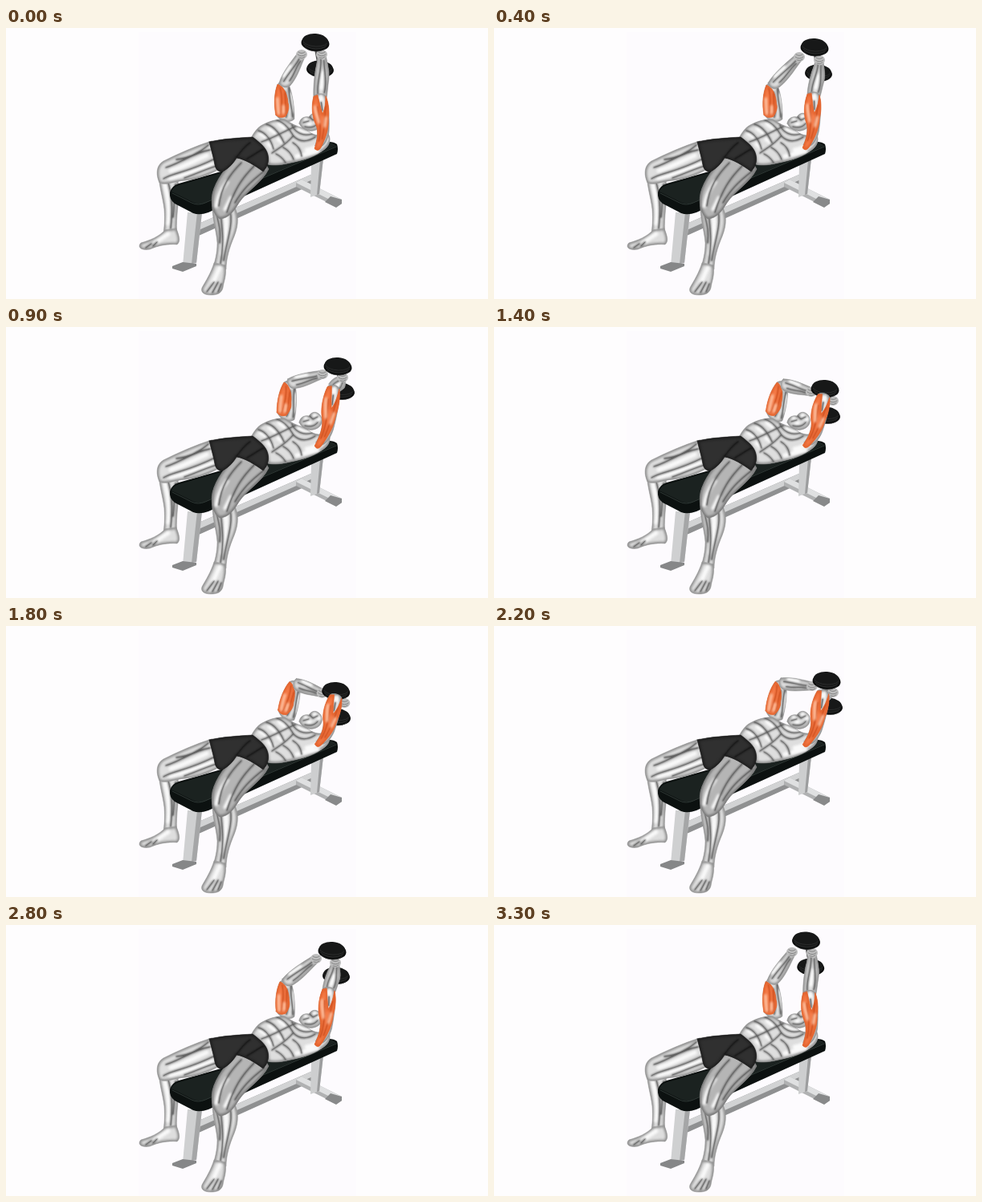
Animation, 600 px wide and 338 px high, one loop 3.4 s. Source, as an HTML page with a canvas:

```html
<!DOCTYPE html>
<html lang="en">
<head>
<meta charset="utf-8">
<title>Lying dumbbell extension</title>
<style>
html, body { margin: 0; width: 100%; height: 100%; overflow: hidden; background: #fefdfe; }
canvas { display: block; }
</style>
</head>
<body>
<canvas id="stage" width="600" height="338"></canvas>
<script>
const ctx = document.getElementById('stage').getContext('2d');
const SKIN = '#dedede', SHADE = '#8c8c8c', LINE = '#555';
const STEP = 100, STEPS = 34;

// step, far elbow, far wrist, near elbow, near wrist, upper plate, lower plate
const poses = [
  [0, 346, 70, 368, 33, 391, 85, 393, 33, 385, 18, 391, 51],
  [4, 347, 71, 380, 36, 398, 83, 405, 40, 399, 24, 404, 56],
  [6, 349, 71, 386, 42, 402, 81, 410, 47, 406, 32, 411, 63],
  [9, 354, 70, 394, 59, 408, 76, 419, 63, 413, 49, 417, 80],
  [12, 358, 71, 396, 75, 410, 83, 422, 83, 414, 68, 417, 100],
  [14, 360, 71, 395, 81, 411, 86, 422, 92, 412, 77, 414, 110],
  [17, 361, 72, 393, 85, 411, 89, 421, 98, 410, 83, 411, 115]
];

function poseAt(step) {
  const k = Math.min(step, STEPS - step);
  const i = Math.max(1, poses.findIndex(p => p[0] >= k));
  const a = poses[i - 1], b = poses[i];
  const f = (k - a[0]) / (b[0] - a[0]);
  const v = a.map((n, j) => n + (b[j] - n) * f);
  return [1, 3, 5, 7, 9, 11].map(j => [v[j], v[j + 1]]);
}

function fill(d, color) {
  ctx.fillStyle = color;
  ctx.fill(new Path2D(d));
}

function stroke(d, color, width, blur = 0) {
  ctx.filter = blur ? `blur(${blur}px)` : 'none';
  ctx.strokeStyle = color;
  ctx.lineWidth = width;
  ctx.stroke(new Path2D(d));
  ctx.filter = 'none';
}

// Rounded muscle: flat base, soft dark rim, creases and highlights
function part(d, lines = '', glow = '', base = SKIN, rim = SHADE, crease = LINE) {
  ctx.save();
  fill(d, base);
  ctx.clip(new Path2D(d));
  stroke(d, rim, 4, 1.8);
  stroke(glow, '#fafafa', 5, 1.6);
  stroke(lines, crease, 1.8, 1.1);
  stroke(lines, crease, 0.6, 0.4);
  ctx.restore();
  stroke(d, rim, 0.5);
}

// Local space: origin at a, y runs 0..50 towards b, x in pixels
function bone(a, b, draw) {
  const dx = b[0] - a[0], dy = b[1] - a[1], len = Math.hypot(dx, dy);
  ctx.save();
  ctx.transform(-dy / len, dx / len, dx / 50, dy / 50, a[0], a[1]);
  draw();
  ctx.restore();
}

function orange(d, lines, glow) {
  part(d, lines, '', '#f67c49', '#e2632d', '#cf5120');
  stroke(glow, '#ffcdb0', 3, 1.4);
}

function ellipse(x, y, rx, ry, tilt, color) {
  ctx.beginPath();
  ctx.ellipse(x, y, rx, ry, tilt, 0, 7);
  ctx.fillStyle = color;
  ctx.fill();
}

function plate([x, y], rx, ry) {
  ellipse(x, y + 1, rx, ry - 1, 0.08, '#0b0c0c');
  ellipse(x, y - 1, rx - 1, ry - 1, 0.08, '#171818');
  for (let i = 0; i < 3; i++) {
    ctx.beginPath();
    ctx.ellipse(x, y - 2 + i * 3, rx - 2 - i, ry - 4, 0.08, 0.3, 2.8);
    ctx.lineWidth = 0.8;
    ctx.strokeStyle = '#303232';
    ctx.stroke();
  }
}

function hand([x, y]) {
  ellipse(x, y, 7, 6, 0, '#bdbdbd');
  stroke(`M${x - 4} ${y - 3}q4 3 8 0M${x - 5} ${y}q5 4 10 0M${x - 3} ${y + 4}q4 2 7 -1`, '#777', 0.8);
}

function bench() {
  fill('M240 244L384 181V194L240 259Z', '#8f9091');
  fill('M240 244L384 181V188L240 252Z', '#d2d3d4');
  fill('M361 193L368 189L418 214V219L411 223L361 198Z', '#b0b1b2');
  fill('M361 193L368 189L418 214L411 218Z', '#dfe0e1');
  fill('M397 217L404 210L418 214V219L411 224Z', '#88898a');
  fill('M380 170L395 163L390 207L379 211Z', '#cdcecf');
  fill('M391 165L395 163L390 207L387 208Z', '#9c9d9e');
  fill('M226 230H244L237 293L220 296Z', '#cfd0d1');
  fill('M238 230H244L237 293L231 294Z', '#a5a6a7');
  fill('M207 297L220 292L237 294V297L220 304L207 300Z', '#868788');
  fill('M204 205Q206 197 215 194L394 143Q406 140 412 145Q414 151 412 157L252 230Q241 234 233 231L210 219Q203 214 204 205Z', '#0c1110');
  fill('M206 204Q208 198 216 196L394 144Q405 141 411 147L248 218Q239 221 232 217Z', '#1b2220');
  stroke('M207 206L231 218Q239 222 248 218L411 148', '#303936', 1, 0.4);
}

function farCalf() {
  part('M190 180C190 196 195 210 197 226C198 240 197 249 196 256L213 258C211 244 214 225 215 208L214 186Z',
    'M201 190C206 205 208 222 205 250M211 195C209 210 210 220 208 236', 'M198 196C203 215 204 228 202 244');
  part('M198 252C191 260 179 265 168 268C163 273 168 278 179 276C190 271 202 269 213 270C218 266 215 258 212 250Z',
    'M181 269L174 274M188 267L183 272', 'M202 257L187 267');
}

function farThigh() {
  part('M256 141C236 147 212 158 196 166C186 172 187 184 191 193C199 197 209 191 224 190C243 188 258 180 272 173Z',
    'M199 174C216 169 235 155 254 152M196 188C207 181 226 180 260 163M222 187C234 183 244 178 262 172M212 164C224 163 238 158 252 146',
    'M205 178C222 173 234 166 250 159M204 187C218 185 236 178 256 170');
}

function nearLeg() {
  part('M257 212C255 233 262 252 263 268C263 282 260 290 258 299L274 301C274 288 278 274 284 260C290 245 290 232 283 220Z',
    'M267 230C269 250 272 265 267 294M279 228C283 246 275 264 271 290M262 232C266 248 267 255 266 268', 'M273 232C276 250 272 266 269 282');
  part('M259 293C255 306 249 315 244 324C242 330 247 333 255 333C263 333 268 331 270 324C271 316 275 309 273 296Z',
    'M259 317L250 329M264 317L257 330M268 319L264 329', 'M266 299L258 317');
  part('M290 157C274 172 261 190 257 206C254 222 259 234 266 238C277 238 284 228 290 218C299 204 318 194 327 176L318 160Z',
    'M293 168C278 183 268 198 265 222M309 172C293 188 284 202 275 230M322 178C304 192 295 201 285 218',
    'M275 192C266 204 264 212 262 222M280 212L273 226', '#b5b5b5', '#747474');
}

function shorts() {
  part('M253 142C270 138 290 137 307 136C316 143 324 149 326 158C328 167 325 174 320 179C309 171 298 164 287 162C283 169 277 175 270 179C264 180 261 176 260 171C258 160 255 151 253 142Z',
    'M287 161C292 155 296 148 304 143M300 163C310 158 316 152 321 151', '', '#303030', '#1e1e1e', '#161616');
}

function head() {
  part('M365 119C366 112 372 110 377 111C380 106 385 105 389 108C395 112 395 122 388 126C380 131 369 128 365 119Z',
    'M370 118L377 116M378 111L382 115L388 112M372 123C379 125 384 124 388 119', 'M373 114L378 120M384 110L390 115');
}

function torso() {
  part('M305 137C309 130 313 124 319 121C328 116 339 113 347 114C355 119 362 123 371 125C381 133 391 138 400 130C405 137 404 145 397 151C386 160 371 165 355 168C343 171 332 172 326 170C326 153 316 142 305 137Z',
    'M318 142C331 138 346 129 360 123M331 156C341 149 350 144 357 135M314 128C323 130 330 139 333 151M324 120C333 122 340 130 346 143M337 115C347 118 352 125 358 135M356 121C359 130 371 137 384 131M358 135C366 143 376 142 385 136M336 157C342 160 345 163 348 168M345 149C351 152 355 156 358 164M357 143C364 147 367 152 368 160',
    'M317 132L323 136M328 126L335 131M340 120L347 125M327 145L332 149M339 139L344 142M364 127C369 131 374 132 380 131M374 152C386 150 393 145 399 138M362 160L388 154');
}

function farArm(elbow, wrist) {
  bone([348, 115], elbow, () => {
    part('M-11 7C-14 24 -12 40 -8 50C-3 55 4 54 6 49C10 37 12 17 11 1C5 -5 -6 -2 -11 7Z',
      'M6 45C5 30 9 17 9 4M1 40C3 27 4 15 1 4', 'M8 36L9 12');
    orange('M-12 8C-14 25 -12 40 -8 50C0 48 4 34 4 24C6 16 3 10 0 5C-5 3 -9 4 -12 8Z',
      'M-5 45C-2 31 -4 18 -6 8M1 38C0 26 2 18 0 9', 'M-9 31C-9 24 -9 16 -8 9M-2 20L-2 10');
  });
  bone(elbow, wrist, () => part('M-6 -2C-9 13 -7 31 -5 51L5 51C6 37 10 21 8 5C7 -5 -3 -6 -6 -2Z',
    'M-2 3C-2 18 1 34 0 47M4 8C5 20 2 30 3 41', 'M-5 10L-4 27'));
  hand(wrist);
}

function nearForearm(elbow, wrist) {
  bone(elbow, wrist, () => part('M-8 -2C-9 12 -8 22 -7 32C-5 41 -5 47 -5 51L5 51C6 43 11 32 10 21C9 11 9 3 8 -3Z',
    'M-3 2C-5 18 1 30 -1 46M5 4C8 17 4 31 3 43', 'M1 10L2 28'));
  hand(wrist);
}

function nearUpperArm(elbow) {
  bone([394, 150], elbow, () => {
    part('M-9 3C-4 12 -5 19 -8 29C-11 38 -10 47 -7 51C-3 53 5 53 7 50C11 39 10 25 9 16C7 6 0 -2 -9 3Z',
      'M2 36L1 44', 'M1 49L2 36');
    orange('M-8 50C-12 40 -11 30 -7 23C-4 17 -5 10 -10 0C-5 -4 -2 0 1 5C5 11 9 18 9 28C11 36 10 44 7 50C6 41 5 37 2 33C0 38 -1 44 -3 51Z',
      'M-4 40C-2 27 0 18 -4 7M6 40C5 29 4 20 0 9', 'M-7 40C-7 34 -4 30 -3 25M6 29L4 21');
  });
}

function draw(step) {
  const [farElbow, farWrist, nearElbow, nearWrist, upper, lower] = poseAt(step);
  ctx.fillStyle = '#fefdfe';
  ctx.fillRect(0, 0, 600, 338);
  ctx.fillStyle = '#fdfbfe';
  ctx.fillRect(165, 5, 271, 333);
  farCalf();
  bench();
  farArm(farElbow, farWrist);
  torso();
  head();
  farThigh();
  nearLeg();
  shorts();
  stroke(`M${upper}L${lower}`, '#555', 5);
  plate(lower, 17, 10.5);
  nearForearm(nearElbow, nearWrist);
  plate(upper, 17.5, 11);
  nearUpperArm(nearElbow);
}

ctx.lineCap = ctx.lineJoin = 'round';
let shown = -1;
const start = performance.now();
function tick() {
  const step = Math.floor((performance.now() - start) / STEP) % STEPS;
  if (step !== shown) draw(shown = step);
  requestAnimationFrame(tick);
}
tick();
</script>
</body>
</html>
```
